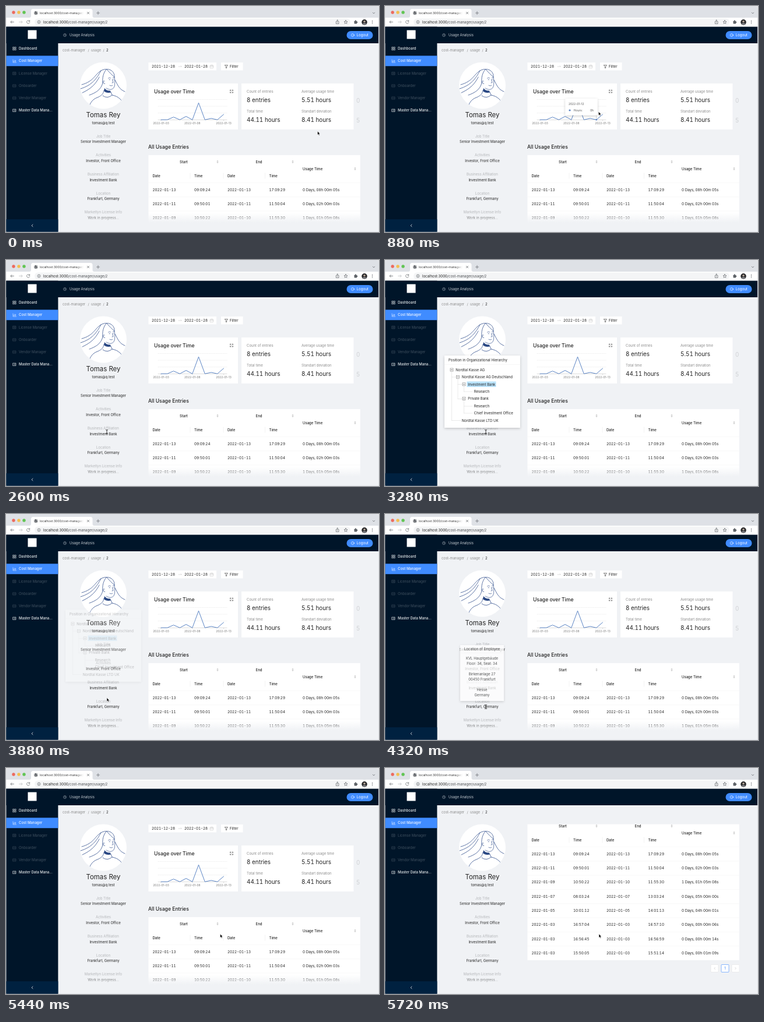
These frames come from a looping animation (640x388 px, 5760 ms). An HTML page:

```html
<!DOCTYPE html>
<html lang="en">
<head>
<meta charset="utf-8">
<title>Usage Analysis</title>
<style>
  html, body { margin: 0; height: 100%; overflow: hidden; background: #fff; }
  svg { display: block; width: 100%; height: 100%; font-family: Inter, "Open Sans", sans-serif; }
  .tab { font-variant-numeric: tabular-nums; }
</style>
</head>
<body>
<svg id="stage" viewBox="0 0 640 388"></svg>
<script>
const LOOP = 5760, INK = '#222', GRAY = '#8c8c8c', PALE = '#b4b6b9', BLUE = '#408cff', NAVY = '#001529';

// y is the vertical middle of the line of text
const text = (x, y, s, { size = 6, fill = INK, weight = 400, anchor = 'start', extra = '' } = {}) =>
  `<text x="${x}" y="${y + size * .36}" font-size="${size}" fill="${fill}" font-weight="${weight}" text-anchor="${anchor}" ${extra}>${s}</text>`;
const rect = (x, y, w, h, fill, extra = '') =>
  `<rect x="${x}" y="${y}" width="${w}" height="${h}" fill="${fill}" ${extra}/>`;
const line = (d, stroke, width = .7, extra = '') =>
  `<path d="${d}" fill="none" stroke="${stroke}" stroke-width="${width}" stroke-linecap="round" stroke-linejoin="round" ${extra}/>`;
const dot = (x, y, r, fill, extra = '') => `<circle cx="${x}" cy="${y}" r="${r}" fill="${fill}" ${extra}/>`;
const ring = (x, y, r, stroke, width = .7) => dot(x, y, r, 'none', `stroke="${stroke}" stroke-width="${width}"`);
const shadow = 'filter="url(#shadow)"';

function browser() {
  const c = '#5f6368';
  return rect(0, 0, 640, 388, '#e4e6e9') + rect(.5, .5, 638.5, 24, '#dee1e6', 'rx="5"') +
    rect(.5, 20, 638.5, 16, '#fff') +
    dot(13, 11, 2.7, '#ed6a5e') + dot(22, 11, 2.7, '#f4bf4f') + dot(31, 11, 2.7, '#61c554') +
    '<path d="M40 20Q43 20 43 17V8.500Q43 5 46.500 5H145Q148.500 5 148.500 8.500V17Q148.500 20 151.500 20Z" fill="#fff"/>' +
    dot(51.3, 12, 3, '#4d5156') + line('M49 10.500q2 1 1 2.500M52 9.700q.3 2 1.800 2.300M51 14.300l1.500-1', '#fff', .8) +
    text(58, 12, 'localhost:3000/cost-manager/us', { size: 5.2, fill: 'url(#fade)' }) +
    line('M139.300 10.300l3.400 3.400m0-3.400l-3.400 3.400M158 9.500v5M155.500 12h5', c) +
    line('M629.200 11.200l1.800 1.800 1.800-1.800', c) +
    line('M13.500 27.500h-5.500m2.300-2.300l-2.300 2.300 2.300 2.300', c) +
    line('M22.500 27.500h5.500m-2.300-2.300l2.300 2.300-2.300 2.300', '#b8babd') +
    line('M40.500 26a2.700 2.700 0 1 0 .3 2.300M40.700 24.700v1.700h-1.700', c) +
    rect(49, 21.5, 542, 12, '#f4f5f6', 'rx="6"') +
    ring(56.5, 27.5, 2.5, c) + line('M56.500 27.300v1.500M56.500 26v.1', c) +
    text(64, 27.5, 'localhost:3000<tspan fill="#4a4d51">/cost-manager/usage/2</tspan>', { size: 6.05 }) +
    line('M567 26.500h-.7v4h4.700v-4h-.7M568.700 28.500v-4.500m-1.300 1.300l1.300-1.300 1.300 1.300', c) +
    line('M583 24.500l.9 2 2.100.2-1.600 1.400.5 2.100-1.900-1.100-1.900 1.100.5-2.100-1.600-1.400 2.100-.2z', c) +
    rect(597.5, 25.7, 4.7, 4.7, c, 'rx=".6"') + dot(599.8, 25.3, 1, c) + dot(602.4, 28, 1, c) +
    dot(615, 27.8, 4.8, '#2b2b2d') + dot(615, 26.6, 1.7, '#b9a99c') +
    '<path d="M611.800 31.300Q612 28.700 615 28.700T618.200 31.300Q615 33.800 611.800 31.300" fill="#77787c"/>' +
    [25.5, 27.7, 29.9].map(y => dot(628.5, y, .65, c)).join('');
}

function frame() {
  const items = ['Dashboard', 'Cost Manager', 'License Manager', 'Onboarder', 'Vendor Manager', 'Master Data Mana...'];
  const icons = ['M12 70.500h2v2h-2zM15.200 70.500h2v2h-2zM12 73.700h2v2h-2zM15.200 73.700h2v2h-2z', 'M12 92v5h5.500M13.500 95.500v-1M15 95.500v-2.500M16.500 95.500v-2',
    'M12 113.500h5v4.500h-5zM13 115h3M13 116.500h3', 'M12 135h5v4h-5zM13 137h3', 'M12 156h5v4h-5zM13 158h3', 'M12 177h5v4.500h-5zM13 178.500h.1M14.500 178.500h1.500M13 180h.1M14.500 180h1.500'];
  return rect(.5, 35.6, 638.5, 351.9, '#f0f2f5') + rect(.5, 35.6, 638.5, 28.4, NAVY) + rect(.5, 35.6, 88.9, 351.9, NAVY) +
    rect(37.5, 41.5, 15, 15, '#fff') + rect(.5, 85.4, 88.9, 17.8, BLUE) +
    items.map((s, i) => {
      const dim = i > 1 && i < 5;
      return `<g opacity="${dim ? .25 : .92}">` + line(icons[i], '#fff', .6) +
        text(22, 73 + i * 21.25, s, { fill: '#fff', weight: dim ? 400 : 500 }) + '</g>';
    }).join('') +
    rect(.5, 366.2, 88.9, 21.3, '#002140') + line('M46 375l-2 2 2 2', '#fff') +
    ring(101, 50, 2.4, '#b7bec6', .6) + line('M101 48.700v1.500h1', '#b7bec6', .5) +
    text(109, 50, 'Usage Analysis', { fill: '#c9ced4', size: 5.9 }) +
    rect(584.5, 42.9, 45, 14.2, BLUE, 'rx="7.100"') +
    line('M596.500 48.200a2.500 2.500 0 1 0 0 3.600M595 50h3m-1-1l1 1-1 1', '#fff', .6) +
    text(601.5, 50, 'Logout', { fill: '#fff', size: 6.2 }) +
    text(97, 76, 'cost-manager', { fill: GRAY, size: 5.9 }) + text(140.5, 76, '/', { fill: GRAY }) +
    text(146, 76, 'usage', { fill: GRAY, size: 5.9 }) + text(166.5, 76, '/', { fill: GRAY }) + text(172, 76, '2');
}

function portrait() {
  const c = '#35528f';
  return dot(167, 136.5, 40, '#fff') + '<g clip-path="url(#face)">' +
    line(`M186 122C187 110 174 105 163 111C153 117 150 130 130 135M163 111C156 124 148 136 128 142M160 122C154 134 146 142 131 149
      M166 132C163 144 154 149 143 153M172 109C167 115 165 123 166 132M173 109Q180 117 186 122`, c, .8) +
    line(`M186 122C187 129 187 134 186 138C184 144 178 145 172 141M175.500 124q2-1.500 4-.3M183.500 123.500l2-.2M177 126.500h1.500M184 126.500h.8
      M182.500 126l1.500 5.500-2 .5M178 136.300q2.500 1.700 4.700 0M169 129q-3-1-2.300 2 .8 2.500 3 2.500`, c, .7) +
    '<path d="M169 141Q172 145.500 179 145.500L180 148.500Q172 150 168 146Z" fill="#294783"/>' +
    line(`M168 145C167 151 164 154 157 157C148 160 144 167 142 175M180 148L182 153C193 155 199 161 202 170M166 154Q174 160 182 153
      M187 127C192 136 194 143 204 147`, c, .8) + '</g>';
}

function profile() {
  const mid = { anchor: 'middle' };
  const rows = [['Job Title', 'Senior Investment Manager'], ['Activities', 'Investor, Front Office'],
    ['Business Affiliation', 'Investment Bank'], ['Location', 'Frankfurt, Germany'], ['Marketlyn License Info', 'Work in progress...']];
  return portrait() + text(167, 186.5, 'Tomas Rey', { ...mid, size: 11.4 }) + text(167, 200.5, 'tomas@q.test', mid) +
    rows.map(([k, v], i) => text(167, 223.7 + i * 32.6, k, { ...mid, fill: PALE }) +
      text(167, 233.3 + i * 32.6, v, mid)).join('');
}

// Hours per day, from 3 to 13 January
const hours = [0, 0, 4, 0, 5, 0, 25.1, 0, 2, 0, 8];
const dayX = i => 266 + i * 10.75, hourY = h => 195.3 - h * 1.16;
const date = i => '2022-01-' + String(i + 3).padStart(2, '0');

function chart() {
  return rect(244.5, 133, 153.5, 79, '#fff') + text(254, 146.7, 'Usage over Time', { size: 8.6, weight: 500 }) +
    line('M386 145.600l-1.300-1.300M388 145.600l1.300-1.300M386 147.600l-1.300 1.300M388 147.600l1.300 1.300M384.600 145.500v-1.300h1.300M388.100 144.200h1.300v1.300M389.400 147.700v1.300h-1.300M385.900 149h-1.300v-1.300', '#333', .55) +
    [10, 20, 30].map(h => line(`M261 ${hourY(h)}H379`, '#dcdcdc', .4, 'stroke-dasharray="1.500 1.500"')).join('') +
    line('M261 195.500H379', '#bbb', .5) +
    [0, 5, 10].map(i => line(`M${dayX(i)} 195.500v1.500`, '#bbb', .5) +
      text(dayX(i), 201.5, date(i), { size: 4.9, fill: '#777', anchor: 'middle' })).join('') +
    line('M' + hours.map((h, i) => `${dayX(i)} ${hourY(h)}`).join('L'), '#5b84c4', 1);
}

function stats() {
  const cells = [[413, 147, 'Count of entries', '8 entries'], [507, 147, 'Average usage time', '5.51 hours'],
    [413, 181, 'Total time', '44.11 hours'], [507, 181, 'Standart deviation', '8.41 hours']];
  const big = { size: 9.9, extra: 'class="tab"' };
  return rect(404, 133, 192.4, 79, '#fff') +
    cells.map(([x, y, k, v]) => text(x, y, k, { fill: GRAY }) + text(x, y + 14.8, v, big)).join('') +
    text(601, 162, '0', { ...big, fill: '#cfd1d4' }) + text(601, 196, '5', { ...big, fill: '#cfd1d4' });
}

function table() {
  const rows = ['13 09:09:24 13 17:09:29 0 08 00 05', '11 09:50:01 11 11:50:04 0 02 00 03', '09 10:50:22 10 11:55:30 1 01 05 08',
    '07 08:03:24 07 13:03:24 0 05 00 00', '05 10:01:12 05 14:01:13 0 04 00 01', '03 16:57:04 03 16:57:10 0 00 00 06',
    '03 16:56:45 03 16:56:59 0 00 00 14', '03 15:50:05 03 15:51:14 0 00 01 09'];
  const head = { weight: 500 }, col = [251.5, 323, 380, 451.5, 509];
  const sort = (x, y) => `<path d="M${x - 1.7} ${y - .6}h3.400l-1.700-2zM${x - 1.7} ${y + .6}h3.400l-1.700 2z" fill="#bfbfbf"/>`;
  const box = (x, stroke) => rect(x, 505.5, 13, 13, '#fff', `rx="1" stroke="${stroke}" stroke-width=".6"`);
  return text(244, 242.3, 'All Usage Entries', { size: 8.6, weight: 500 }) + rect(244.5, 256, 363.5, 242, '#fff') +
    text(305, 267.5, 'Start', { ...head, anchor: 'middle' }) + text(434, 267.5, 'End', { ...head, anchor: 'middle' }) +
    text(509, 279.5, 'Usage Time', head) + sort(363, 267.5) + sort(492, 267.5) + sort(599, 279.5) +
    ['Date', 'Time', 'Date', 'Time'].map((s, i) => text(col[i], 291.5, s, head)).join('') +
    [316, 373, 444.5].map(x => line(`M${x} 287v9`, '#e6e6e6', .5)).join('') +
    rows.map((row, i) => {
      const [d1, t1, d2, t2, d, h, m, s] = row.split(' '), y = 315.6 + i * 24.33;
      return line(`M244.500 ${y - 12.2}H608`, '#f3f3f3', .5) +
        ['2022-01-' + d1, t1, '2022-01-' + d2, t2, `${d} Days, ${h}h ${m}m ${s}s`]
          .map((v, k) => text(col[k], y, v, { size: 6.2, extra: 'class="tab"' })).join('');
    }).join('') +
    box(559, '#e3e3e3') + box(577, BLUE) + box(595, '#e3e3e3') + line('M566.500 510.300l-1.700 1.700 1.700 1.700M600.700 510.300l1.700 1.700-1.700 1.700', '#c4c4c4', .6) +
    text(583.5, 512, '1', { fill: BLUE, anchor: 'middle', weight: 500 });
}

function filters() {
  const opt = { size: 6.2, extra: 'class="tab"' };
  return rect(244.5, 97, 116.5, 13.5, '#fff') + text(250, 104, '2021-12-28', opt) + text(306, 104, '2022-01-28', opt) +
    line('M296 104h5.500l-1.500-1.200', '#bbb', .5) + line('M350.500 102h5v4.500h-5zM350.500 103.500h5M352 102v-1M354 102v-1', '#bbb', .5) +
    rect(369, 97, 37.5, 13.5, '#fff') + line('M375.500 101.500h5l-1.800 2.500v2.500h-1.400v-2.500z', '#333', .6) + text(384, 104, 'Filter', { size: 6.1 });
}

function hierarchy() {
  const rows = [[0, 'Nordtal Kasse AG', 1], [1, 'Nordtal Kasse AG Deutschland', 1], [2, 'Investment Bank', 1], [3, 'Research'],
    [2, 'Private Bank', 1], [3, 'Research'], [3, 'Chief Investment Office'], [1, 'Nordtal Kasse LTD UK']];
  return rect(102, 164, 130, 124, '#fff', shadow) + text(109, 171.5, 'Position in Organizational Hierarchy') +
    line('M102 179.500H232', '#eee', .5) + rect(140.5, 208.5, 50, 9.5, '#bae3fb') +
    line('M114.500 191.500V275.500M125 204V238.500M135.500 216.500V226M135.500 241V263M114.500 201H122M114.500 275.500H130M125 213.500H133M125 238.500H133M135.500 226H150M135.500 251H150M135.500 263H150', '#d4d4d4', .5) +
    rows.map(([depth, s, open], i) => {
      const x = 114.5 + depth * 10.5, y = 188.5 + i * 12.43;
      return (open ? rect(x - 2.5, y - 2.5, 5, 5, '#fff', 'stroke="#666" stroke-width=".5"') + line(`M${x - 1.2} ${y}h2.400`, '#444', .6) : '') +
        text(x + 6.8, y, s);
    }).join('');
}

function office() {
  const lines = ['KVL Hauptgebäude', 'Floor: 34, Seat: 34', '', 'Birkenanlage 27', '00450 Frankfurt', '', 'Hesse', 'Germany'];
  return rect(129, 225, 75, 96, '#fff', shadow) + text(166.5, 231.5, 'Location of Employee', { anchor: 'middle' }) +
    line('M129 238.500H204', '#eee', .5) +
    lines.map((s, i) => text(166.5, 247.5 + i * 9.1, s, { anchor: 'middle' })).join('');
}

const stage = document.getElementById('stage');
stage.innerHTML = `<defs>
  <clipPath id="view"><path d="M240 96.500H607.800V372H240Z"/></clipPath>
  <clipPath id="face"><circle cx="167" cy="136.500" r="40"/></clipPath>
  <filter id="shadow" x="-20%" y="-20%" width="140%" height="140%"><feDropShadow dx="0" dy="1.500" stdDeviation="2" flood-opacity=".2"/></filter>
  <linearGradient id="fade" gradientUnits="userSpaceOnUse" x1="120" x2="134"><stop stop-color="#333"/><stop offset="1" stop-color="#333" stop-opacity="0"/></linearGradient>
  <linearGradient id="haze" x2="0" y2="1"><stop stop-color="#f0f2f5" stop-opacity="0"/><stop offset="1" stop-color="#f0f2f5"/></linearGradient>
  </defs>` + browser() + frame() + profile() + `
  <g clip-path="url(#view)"><g id="scroll">${filters() + chart() + stats() + table()}
    <g id="mark">${line('M0 160V195.500', '#aaa', .5)}<circle id="point" r="1.300" fill="#5b84c4"/></g>
    <g id="tip">${rect(0, 159, 55, 28.5, '#fff', shadow + ' rx="1"') + text(5.5, 168, '<tspan id="day"></tspan>', { size: 4.9, fill: '#555' }) +
      dot(7.5, 179, 1.6, '#5b84c4') + text(14, 179, 'Hours:', { size: 5, fill: '#555' }) + text(48.5, 179, '<tspan id="value"></tspan>', { size: 5, fill: '#555', anchor: 'end' })}</g>
  </g></g>${rect(90, 355, 548, 17, 'url(#haze)')}
  <g id="pop1">${hierarchy()}</g><g id="pop2">${office()}</g>
  <path id="arrow" d="M0 0V6.300L1.500 5L2.500 7.300L3.600 6.800L2.600 4.600H4.500Z" fill="#000" stroke="#fff" stroke-width=".5"/>
  <g id="beam">${line('M-1.500-3.500Q0-3.500 0-2.500Q0-3.500 1.500-3.500M0-2.500V2.500M-1.500 3.500Q0 3.500 0 2.500Q0 3.500 1.500 3.500', '#111', .8)}</g>`;

const el = id => document.getElementById(id);
const clamp = v => Math.min(1, Math.max(0, v));
const smooth = p => p * p * (3 - 2 * p);
const show = (id, on) => el(id).setAttribute('opacity', +on);
const move = (id, x, y) => el(id).setAttribute('transform', `translate(${x} ${y})`);

// time, x, y, and 1 for a steady pace up to this point
const path = [[0, 534.5, 215], [160, 534.5, 215], [640, 367.5, 182], [880, 366.5, 181.5], [1760, 284.5, 185, 1], [1960, 255, 192, 1],
  [2560, 173, 295], [3640, 173, 295], [4080, 173, 331], [4840, 173, 331], [5320, 367.5, 285], [5440, 367.5, 285], [5760, 367, 285]];

function cursorAt(t) {
  const i = Math.max(1, path.findIndex(k => k[0] > t));
  const [a, b] = [path[i - 1], path[i]];
  let p = clamp((t - a[0]) / (b[0] - a[0]));
  if (!b[3]) p = smooth(p);
  return [a[1] + (b[1] - a[1]) * p, a[2] + (b[2] - a[2]) * p];
}

const fade = (t, from, to) => (1 - (1 - clamp((t - from) / 160)) ** 3) * (1 - clamp((t - to) / 160));

function draw(now) {
  const t = now % LOOP, [x, y] = cursorAt(t);
  const beam = Math.abs(x - 173) < 30 && (Math.abs(y - 298) < 6 || Math.abs(y - 331) < 5);
  move('arrow', x, y); move('beam', x, y);
  show('arrow', !beam); show('beam', beam);

  // The chart marker trails the pointer a little
  const [hx, hy] = cursorAt(Math.max(0, t - 120));
  const over = hx > 258 && hx < 390 && hy > 155 && hy < 212;
  const i = Math.min(10, Math.max(0, Math.round((hx - 266) / 10.75)));
  show('mark', over); show('tip', over);
  move('mark', dayX(i), 0);
  move('tip', Math.min(dayX(i) + 10, 309.5), 0);
  el('point').setAttribute('cy', hourY(hours[i]));
  el('day').textContent = date(i);
  el('value').textContent = hours[i] + 'h';

  show('pop1', fade(t, 2680, 3760));
  show('pop2', fade(t, 4260, 4920));
  move('scroll', 0, -168 * smooth(clamp((t - 5450) / 250)));
}

const start = performance.now();
(function tick() {
  draw(performance.now() - start);
  requestAnimationFrame(tick);
})();
</script>
</body>
</html>
```
